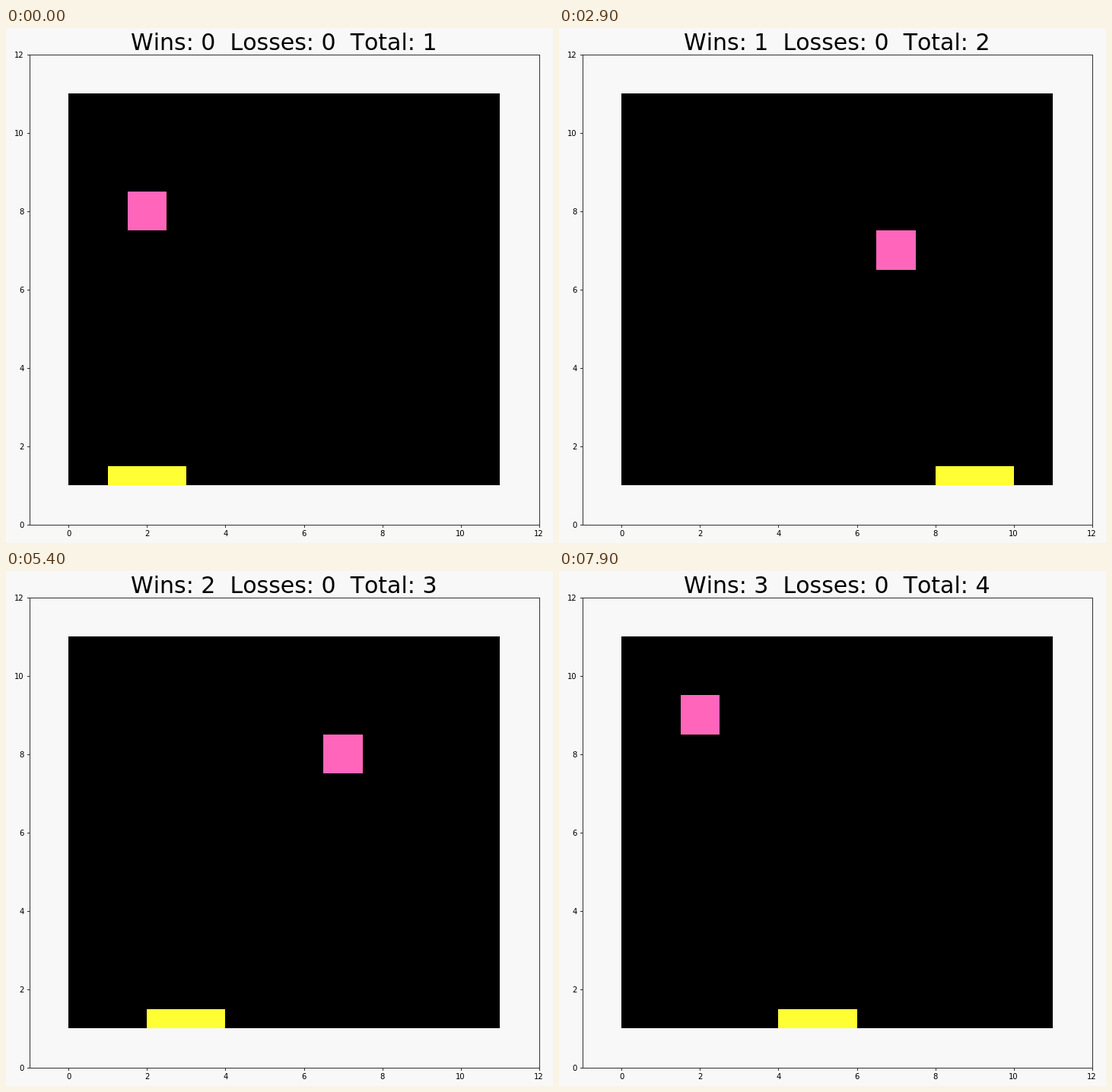
Write an HTML page with a canvas that moves like this. It is 719 px wide and 677 px high and loops after 8000 ms.

```html
<!DOCTYPE html>
<html lang="en">
<head>
<meta charset="utf-8">
<title>Catch game</title>
<style>
  html, body { margin: 0; width: 100%; height: 100%; overflow: hidden; background: #f8f8f8; }
  canvas { display: block; }
</style>
</head>
<body>
<canvas id="stage" width="719" height="677"></canvas>
<script>
const ctx = document.getElementById('stage').getContext('2d');
const LOOP = 8000;
const TICK = 100;
const TOP_ROW = 10;
const CATCH_ROW = 2;

// Block column and the cells the paddle visits; it moves one cell per step.
// A repeated cell is a one-step wait.
const rounds = [
  { x: 2, top: 8, visits: [1, 1, 2, 1, 2] },
  { x: 7, visits: [5, 8, 7, 8, 6, 7] },
  { x: 7, visits: [2, 1, 5, 4, 6] },
  { x: 2, visits: [4] }
];

function walk([cell, ...targets]) {
  const path = [cell];
  for (const target of targets) {
    do {
      cell += Math.sign(target - cell);
      path.push(cell);
    } while (cell !== target);
  }
  return path;
}

// Steps get slower each round; a fresh block waits only briefly at the top.
let clock = 0;
rounds.forEach((round, i) => {
  const top = round.top || TOP_ROW;
  round.path = walk(round.visits);
  round.step = 307 + 18 * i;
  round.start = clock;
  round.top = top;
  round.pause = i ? 220 - 40 * i : round.step;
  clock += round.pause + round.step * (top - CATCH_ROW);
});

function stateAt(t) {
  const now = Math.floor(t / TICK) * TICK + TICK - 1;
  const i = rounds.findLastIndex(r => r.start <= now);
  const { x, top, path, step, start, pause } = rounds[i];
  const n = Math.max(0, Math.floor((now - start - pause) / step) + 1);
  const y = top - n;
  const paddle = path[Math.min(n, path.length - 1)];
  return { x, y, paddle, wins: i + (y === CATCH_ROW), total: i + 1 };
}

const plotX = u => 82.46 + 51.508 * u;
const plotY = v => 652.95 - 51.53 * v;
const px = u => Math.round(plotX(u));
const py = v => Math.round(plotY(v));

function box(x0, y0, x1, y1, color) {
  ctx.fillStyle = color;
  ctx.fillRect(px(x0), py(y1), px(x1) - px(x0), py(y0) - py(y1));
}

function text(str, x, y, size, spacing) {
  ctx.font = `${size}px "DejaVu Sans", sans-serif`;
  ctx.letterSpacing = spacing;
  ctx.fillStyle = '#000';
  ctx.fillText(str, x, y);
}

function drawAxes() {
  const left = px(-1), right = px(12), top = py(12), bottom = py(0);
  ctx.strokeStyle = '#323232';
  ctx.lineWidth = 1;
  ctx.strokeRect(left + 0.5, top + 0.5, right - left, bottom - top);
  for (let n = 0; n <= 12; n += 2) {
    const wide = n >= 10;
    ctx.fillStyle = '#323232';
    ctx.fillRect(px(n), bottom + 1, 1, 3);
    ctx.fillRect(left - 3, py(n), 3, 1);
    text(n, Math.round(plotX(n) - (wide ? 6.5 : 2.5)), 668, 10, '-1px');
    text(n, wide ? 11 : 18, py(n) + 4, 10, '-1px');
  }
}

function draw(t) {
  const s = stateAt(t);
  ctx.fillStyle = '#f8f8f8';
  ctx.fillRect(0, 0, 719, 677);
  box(0, 1, 11, 11, '#000');
  box(s.x - 0.5, s.y - 0.5, s.x + 0.5, s.y + 0.5, '#ff66bb');
  box(s.paddle, 1, s.paddle + 2, 1.5, '#ffff33');
  drawAxes();
  text(`Wins: ${s.wins}  Losses: 0  Total: ${s.total}`, 164, 29, 30, '0px');
}

ctx.fontKerning = 'none';
const begin = performance.now();
function frame() {
  draw((performance.now() - begin) % LOOP);
  requestAnimationFrame(frame);
}
frame();
</script>
</body>
</html>
```
